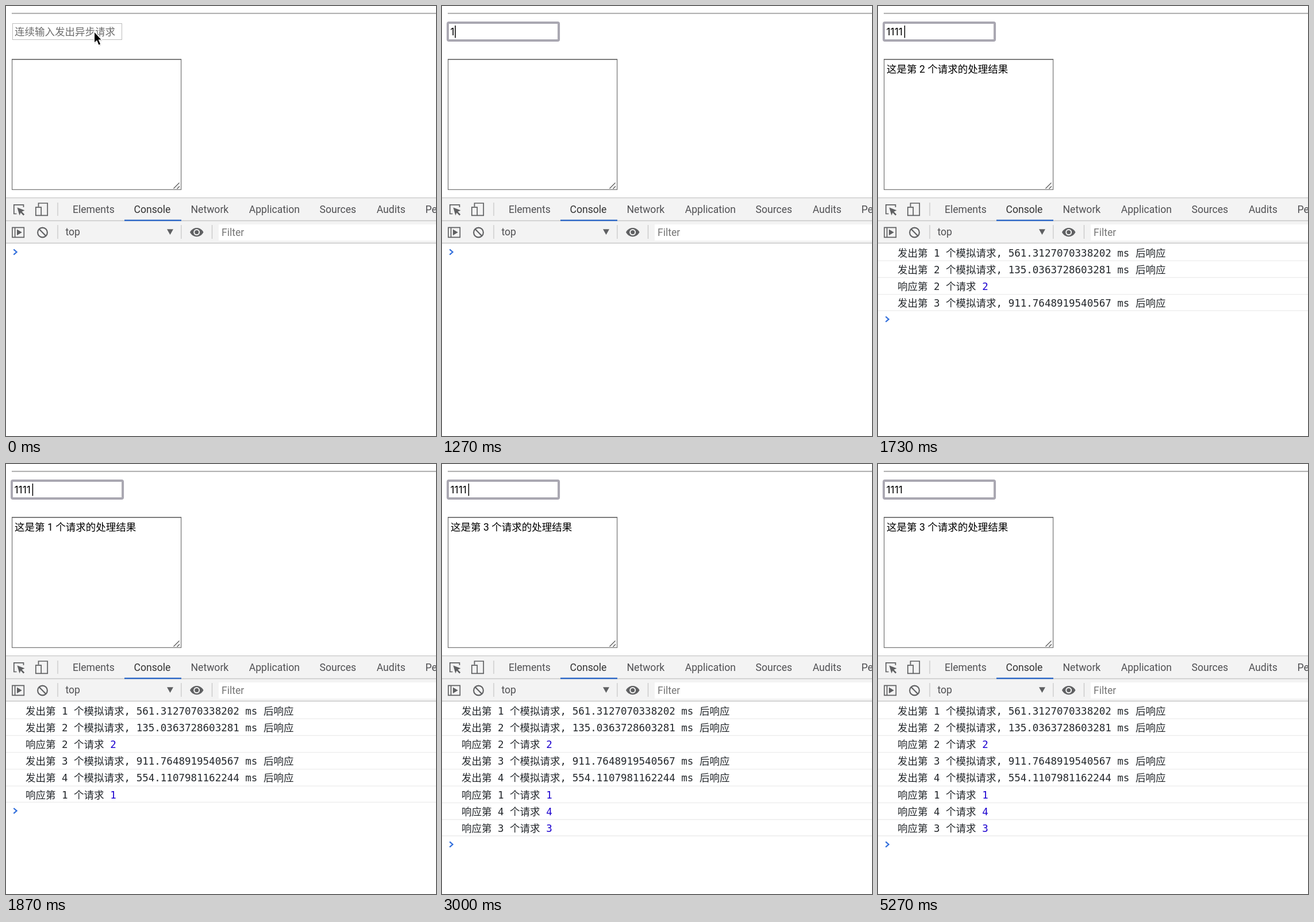
An HTML page for the animation above (5540 ms loop, 748 by 748 pixels).

```html
<!DOCTYPE html>
<html lang="zh">
<head>
<meta charset="utf-8">
<style>
html, body { margin: 0; width: 100%; height: 100%; overflow: hidden; background: #fff }
svg { display: block; width: 748px; height: 748px }
text { white-space: pre; font: 17.6px Roboto, "Noto Sans CJK SC", "Noto Sans CJK", sans-serif; fill: #505053 }
.page text { font-size: 17.5px; fill: #000 }
.page .hint { fill: #6c6c6c }
.page .typed { font-family: Inter, sans-serif }
#log text { font: 17.5px "DejaVu Sans Mono", "Noto Sans CJK SC", "Noto Sans CJK", monospace; fill: #24282c }
#log .num { fill: #1c00cf }
.icon { fill: none; stroke: #5f6062; stroke-width: 1.7 }
.solid { fill: #5f6062; stroke: none }
</style>
</head>
<body>
<svg viewBox="0 0 748 748">
  <g class="page">
    <path d="M10 12.7H748" stroke="#8e8e8e" stroke-width="1.5"/>
    <path d="M10 14H748" stroke="#e6e6e6"/>
    <rect x="11.5" y="30.5" width="190" height="28" fill="#fff" stroke="#bdbdbd"/>
    <rect id="ring" fill="none" stroke="#a9a7b1"/>
    <text id="hint" class="hint" x="15" y="51">连续输入发出异步请求</text>
    <text id="typed" class="typed" x="14.5" y="51"></text>
    <path id="caret" stroke="#000" stroke-width="1.5"/>
    <rect x="10.6" y="92.8" width="294" height="226.6" fill="#fff" stroke="#7b7b7b" stroke-width="1.3"/>
    <path d="M10 92.8H305" stroke="#666" stroke-width="1.4"/>
    <path d="M291.5 317.5L301.5 307.5M297.5 318L302 313.5" stroke="#555" stroke-width="1.2"/>
    <text id="result" y="115.5"></text>
  </g>

  <rect y="333" width="748" height="80" fill="#f3f3f3"/>
  <path d="M0 333.7H748M0 373.5H748M0 412.5H748M90 342V365M90 381V405M304.8 381V405M358.5 381V405" stroke="#c8c8c8" stroke-width="1.3"/>
  <rect x="206" y="371.7" width="99" height="2.4" fill="#2c67c6"/>
  <rect x="370" y="380" width="378" height="28" fill="#fff"/>
  <g id="tabs"></g>
  <text x="103.5" y="399">top</text>
  <text x="375" y="400.3" style="fill:#757575">Filter</text>

  <g class="icon">
    <path d="M18.5 361.5H13.8V345.8H30.5V350"/>
    <path class="solid" d="M19.5 350.5L32.5 355.5L27.5 357.7L32.2 362.6L30.3 364.5L25.6 359.6L23.5 364.3Z"/>
    <path d="M56.5 349V343H72.2V364.3H62M51.8 350.2H61.2V364.3H51.8Z"/>
    <path d="M11 385.3H31.3V402.3H11ZM15.6 385.3V402.3"/>
    <path class="solid" d="M19 388.6L27.8 393.8L19 399Z"/>
    <circle cx="63.5" cy="394" r="8.4" stroke-width="2.1"/>
    <path d="M57.6 388.1L69.4 399.9" stroke-width="2.1"/>
    <path class="solid" d="M280 388.2H291L285.5 398Z"/>
    <path class="solid" d="M320 393.6C325 383.4 338.500 383.4 343.500 393.6C338.500 403.8 325 403.8 320 393.6Z"/>
    <circle cx="331.700" cy="393.600" r="4.500" fill="#5f6062" stroke="#f3f3f3" stroke-width="2"/>
  </g>

  <g id="log"></g>
  <path id="prompt" d="M13.300 -4.600L18.600 0L13.300 4.600" fill="none" stroke="#326fdc" stroke-width="2.200"/>

  <g id="arrow">
    <path d="M154 46V66L158.500 62L161.800 70L165.500 68.300L162 60.700H167.500Z" fill="#000" opacity=".18"/>
    <path d="M153.400 44.300V64.600L157.900 60.600L161 68.300L164.900 66.600L161.600 59.200H167Z" stroke="#fff" stroke-width="1.300"/>
  </g>
  <g id="beam" fill="none">
    <path id="beamShape" d="M149 38.700Q153.800 38.700 153.800 42V52.500Q153.800 55.800 149 55.800M158.600 38.700Q153.800 38.700 153.800 42M153.800 52.500Q153.800 55.800 158.600 55.800M151 48.500H156.600" stroke="#fff" stroke-width="4"/>
    <use href="#beamShape"/>
  </g>
</svg>
<script>
const $ = id => document.getElementById(id);
const LOOP = 5540, ROW = 29.22;
const keys = [1270, 1400, 1600, 1730];
const sent = (n, delay) => `发出第 ${n} 个模拟请求, ${delay} ms 后响应`;

// Console rows in order: time, text, and the request number for a response
const rows = [
  [1330, sent(1, "561.3127070338202")],
  [1470, sent(2, "135.0363728603281")],
  [1530, "响应第 2 个请求 ", 2],
  [1670, sent(3, "911.7648919540567")],
  [1800, sent(4, "554.1107981162244")],
  [1870, "响应第 1 个请求 ", 1],
  [2330, "响应第 4 个请求 ", 4],
  [2530, "响应第 3 个请求 ", 3]
];
// The caret toggles at each of these times
const blinks = [400, 930, 1270, 2270, 2730, 3270, 3730, 4270, 4800, 5270];

const tabs = { Elements: 116, Console: 222.5, Network: 321.5, Application: 422.7, Sources: 545.5, Audits: 644.7, Performance: 729.5 };
$("tabs").innerHTML = Object.entries(tabs).map(([name, x]) =>
  `<text x="${x}" y="359.5"${name == "Console" ? ' style="fill:#333"' : ""}>${name}</text>`).join("");

const attrs = (el, values) => {
  for (const k in values) el.setAttribute(k, values[k]);
};
const show = (id, on) => $(id).style.display = on ? "" : "none";
const countPast = (times, t) => times.filter(x => x <= t).length;

function drawRing(t) {
  show("ring", t >= 400);
  const step = Math.floor((t - 400) / 66) + 1;
  const p = Math.max(0, Math.min(1, step / 7));
  const out = 2 * (1 - p);
  attrs($("ring"), {
    x: 10 - out, y: 29 - out, width: 193.2 + 2 * out, height: 31 + 2 * out,
    rx: 2 + out, "stroke-width": 3.8, opacity: p
  });
}

function drawLog(n) {
  $("log").innerHTML = rows.slice(0, n).map(([, text, id], i) => {
    const line = 443.2 + ROW * i - (i == n - 1 ? 1 : 0);
    return `<path d="M0 ${line}H748" stroke="#ececec" stroke-width="1.3"/>` +
      `<text x="34" y="${435.6 + ROW * i}">${text}${id ? `<tspan class="num">${id}</tspan>` : ""}</text>`;
  }).join("");
  attrs($("prompt"), { transform: `translate(0 ${428 + ROW * n})` });

  const last = rows.slice(0, n).reverse().find(r => r[2]);
  $("result").innerHTML = last
    ? `<tspan x="15">这是第</tspan><tspan x="72">${last[2]}</tspan><tspan x="${last[2] == 4 ? 87 : 86.3}">个请求的处理结果</tspan>`
    : "";
}

let shown = -1;
function frame(now) {
  const t = now % LOOP;
  const chars = countPast(keys, t), n = countPast(rows.map(r => r[0]), t);
  const x = 15 + 7.75 * chars + 0.4;

  show("arrow", t < 400);
  show("beam", t >= 400 && !chars);
  show("hint", !chars);
  show("caret", countPast(blinks, t) % 2);
  attrs($("caret"), { d: `M${x} 34V55.5` });
  $("typed").textContent = "1".repeat(chars);
  drawRing(t);
  if (n != shown) drawLog(shown = n);
  requestAnimationFrame(frame);
}
$("beam").lastElementChild.outerHTML =
  `<path d="${$("beamShape").getAttribute("d")}" stroke="#000" stroke-width="1.700"/>`;
const start = performance.now();
(function loop() {
  requestAnimationFrame(() => frame(performance.now() - start));
});
drawLog(0);
requestAnimationFrame(frame);
</script>
</body>
</html>
```
